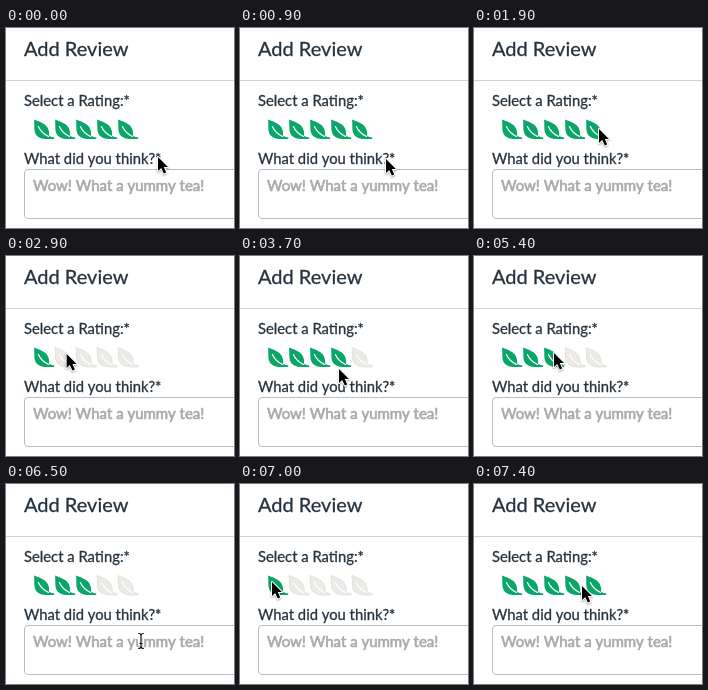
Write an HTML page with a canvas that moves like this. It is 228 px wide and 200 px high and loops after 7.5 s.

```html
<!DOCTYPE html>
<html lang="en">
<head>
<meta charset="utf-8">
<title>Add Review</title>
<style>
  html, body { margin: 0; width: 100%; height: 100%; overflow: hidden; background: #fff; }
  canvas { display: block; width: 228px; height: 200px; }
</style>
</head>
<body>
<canvas id="stage"></canvas>
<script>
const W = 228, H = 200, LOOP = 7500, STEP = 100;
const LEAVES = 5, PITCH = 21, LEFT = 28;
const GREEN = '#0aa667', PALE = '#eceae7', INK = '#26333f';

const canvas = document.getElementById('stage');
const ctx = canvas.getContext('2d');
const ratio = window.devicePixelRatio || 1;
canvas.width = W * ratio;
canvas.height = H * ratio;

// Each eased move: start time, end time, destination
const home = { x: 152, y: 129 };
const moves = [
  [700, 900, 146, 131],
  [1200, 1300, 145, 126],
  [1600, 1900, 125, 101],
  [1900, 2300, 119, 99],
  [2400, 2700, 36, 98],
  [2700, 3200, 106, 98],
  [3600, 3700, 99, 113],
  [3700, 4300, 52, 105],
  [4600, 4900, 99, 107],
  [4900, 5300, 80, 97],
  [5600, 5900, 82, 174],
  [6200, 6500, 135, 157],
  [6500, 7000, 32, 98],
  [7000, 7300, 108, 102]
];

const arrow = new Path2D('M0 0V14L3.2 10.9L5.8 16.6L8.2 15.6L5.8 10H10Z');
const iBeam = new Path2D('M-2.8-7.5Q0-7.5 0-5.5Q0-7.5 2.8-7.5M0-5.5V5.5M-2.8 7.5Q0 7.5 0 5.5Q0 7.5 2.8 7.5M-1.6 2.5H1.6');
const leafBody = new Path2D('M0 1C5 3 11 4.5 13.8 9.5C15.2 12.5 15.4 15.4 15 17.3' +
  'C16.8 18.5 18.5 18.9 20.4 19L20 20.5C11 20.9 4.4 20.2 1.6 15.4C-.4 11.5 .8 6 0 1Z');
const leafVein = new Path2D('M4.4 8C6.4 12.6 9.8 15.8 14.6 18');

const smooth = k => k * k * (3 - 2 * k);
const clamp = k => Math.min(1, Math.max(0, k));

function pointerAt(t) {
  let { x, y } = home;
  for (const [from, to, toX, toY] of moves) {
    const k = smooth(clamp((t - from) / (to - from)));
    x += (toX - x) * k;
    y += (toY - y) * k;
  }
  return { x, y };
}

// The hovered rating follows the pointer one step late.
function ratingAt(t) {
  const { x, y } = pointerAt(t - STEP);
  const hovered = Math.ceil((x - LEFT + 5) / PITCH);
  if (hovered >= 1 && hovered <= LEAVES && y > 86 && y < 119) return hovered;
  return t < 5400 ? 5 : 3;
}

function label(text, x, y, size, weight = 0.3, color = INK) {
  ctx.font = size + 'px Lato, sans-serif';
  ctx.fillStyle = ctx.strokeStyle = color;
  ctx.lineWidth = weight;
  ctx.lineJoin = 'round';
  ctx.fillText(text, x, y);
  ctx.strokeText(text, x, y);
}

function drawForm() {
  ctx.fillStyle = '#fff';
  ctx.fillRect(0, 0, W, H);
  ctx.fillStyle = '#cdd2d7';
  ctx.fillRect(0, 52, W, 1);
  label('Add Review', 18, 28, 20);
  label('Select a Rating:*', 18, 78, 14.8);
  label('What did you think?*', 18, 136, 14.8);
  label('Wow! What a yummy tea!', 27, 163, 15, 0.7, '#aaa');
  ctx.strokeStyle = '#b9bcc0';
  ctx.lineWidth = 1;
  ctx.beginPath();
  ctx.roundRect(18.5, 141.5, W, 49, 3.5);
  ctx.stroke();
}

function drawLeaf(x, filled) {
  ctx.save();
  ctx.translate(x, 90.5);
  ctx.fillStyle = filled ? GREEN : PALE;
  ctx.fill(leafBody);
  if (!filled) {
    ctx.strokeStyle = '#dedbd8';
    ctx.lineWidth = 0.7;
    ctx.stroke(leafBody);
  }
  ctx.strokeStyle = '#fff';
  ctx.lineWidth = 1.2;
  ctx.lineCap = 'round';
  ctx.stroke(leafVein);
  ctx.restore();
}

function drawPointer({ x, y }) {
  const overField = y > 141;
  const shape = overField ? iBeam : arrow;
  ctx.save();
  ctx.translate(x, y);
  ctx.lineJoin = 'round';
  ctx.strokeStyle = '#fff';
  ctx.lineWidth = overField ? 2.8 : 2;
  if (!overField) {
    ctx.shadowColor = 'rgba(0,0,0,.35)';
    ctx.shadowBlur = 2 * ratio;
    ctx.shadowOffsetY = ratio;
  }
  ctx.stroke(shape);
  ctx.shadowColor = 'transparent';
  if (overField) {
    ctx.strokeStyle = '#111';
    ctx.lineWidth = 1.2;
    ctx.stroke(shape);
  } else {
    ctx.fillStyle = '#000';
    ctx.fill(shape);
  }
  ctx.restore();
}

function draw(t) {
  ctx.setTransform(ratio, 0, 0, ratio, 0, 0);
  drawForm();
  const rating = ratingAt(t);
  for (let i = 0; i < LEAVES; i++) drawLeaf(LEFT + PITCH * i, i < rating);
  drawPointer(pointerAt(t));
}

const start = performance.now();
function tick() {
  const t = (performance.now() - start) % LOOP;
  draw(Math.floor(t / STEP) * STEP);
  requestAnimationFrame(tick);
}
tick();
</script>
</body>
</html>
```
